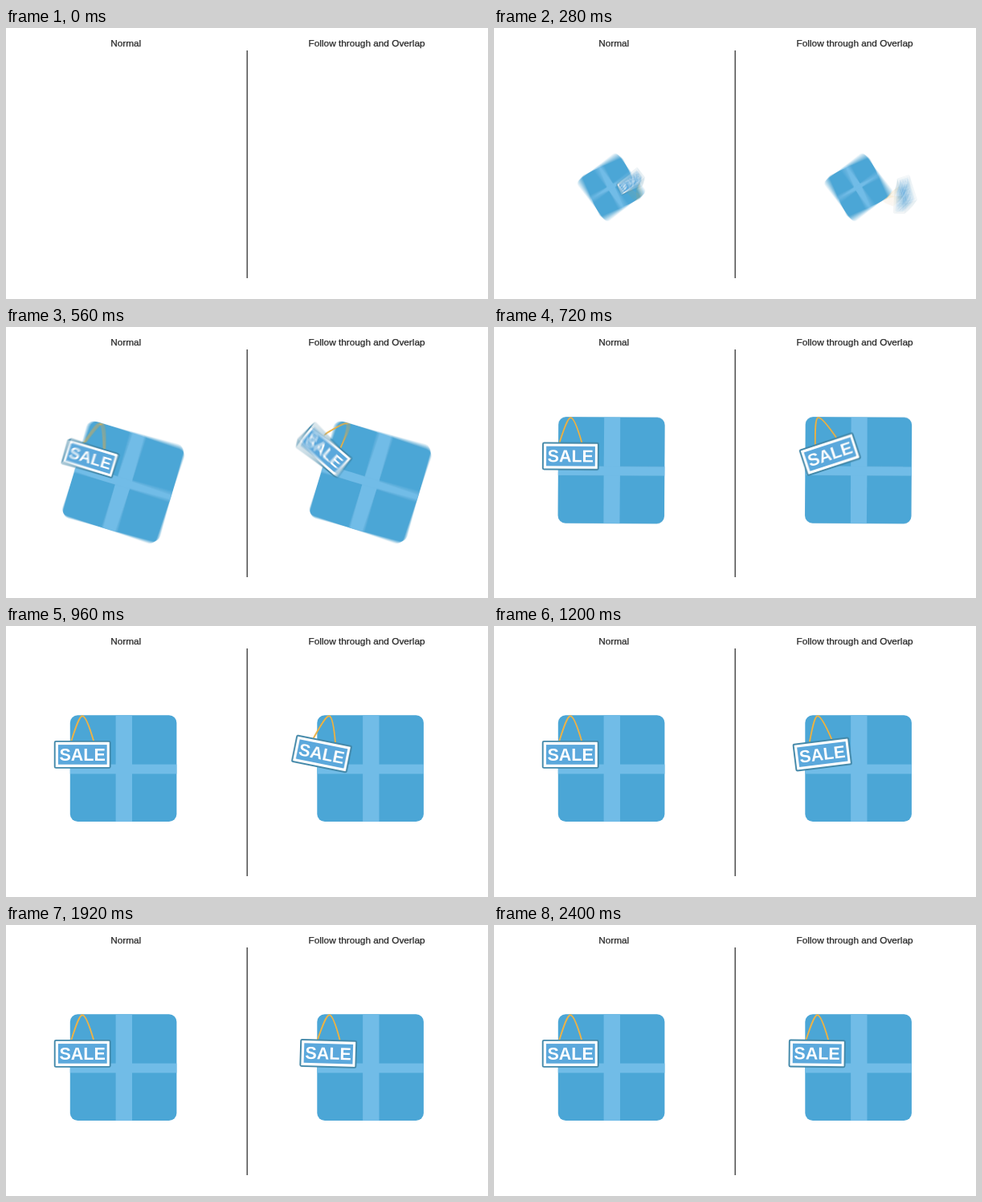
Write an HTML page that moves like this. It is 600 px wide and 338 px high and loops after 2440 ms.

```html
<!DOCTYPE html>
<html lang="en">
<head>
<meta charset="utf-8">
<title>Follow through and overlap</title>
<style>
  html, body { margin: 0; width: 100%; height: 100%; overflow: hidden; background: #fff; }
  svg { display: block; width: 100%; height: 100%; }
  text { font-family: "Liberation Sans", Arial, Helvetica, sans-serif; }
  .label { font-size: 11.8px; fill: #262626; stroke: #262626; stroke-width: .25px; }
  .sale { font-size: 21.5px; font-weight: 700; fill: #fff; text-anchor: middle; }
</style>
</head>
<body>
<svg viewBox="0 0 600 338">
  <defs>
    <g id="box">
      <rect x="-66.3" y="-66.3" width="132.6" height="132.8" rx="9.5" fill="#4ba6d6"/>
      <rect x="-9.5" y="-66.3" width="20.4" height="132.8" fill="#71bce7"/>
      <rect x="-66.3" y="-5" width="132.6" height="11.8" fill="#71bce7"/>
    </g>
    <!-- The origin is the point the tag hangs from. -->
    <g id="tag">
      <path d="M-13.8 32C-9 17 -4 1 0 1S9 15 14 32" fill="none" stroke="#edb246" stroke-width="1.9"/>
      <rect x="-34.4" y="32.6" width="69" height="33" rx="1.5" fill="#fff" stroke="#4389aa" stroke-width="1.9"/>
      <rect x="-30.2" y="36.8" width="60.8" height="24.6" fill="#5ba8dc"/>
      <text class="sale" x="0" y="56.3">SALE</text>
    </g>
  </defs>
  <g id="blur"></g>
  <path d="M300.2 28V312" stroke="#333" stroke-width="1.3"/>
  <text class="label" x="130.2" y="23">Normal</text>
  <text class="label" x="376.6" y="23">Follow through and Overlap</text>
</svg>
<script>
  const LOOP = 2440, STEP = 40, SHUTTER = 20, SAMPLES = 14;
  const SPIN = { start: 150, time: 610, power: 2.48, turn: 270 };
  const LIFT = { start: 460, time: 300, height: 21 };
  const SWING = { rest: 635, speed: 0.32, period: 480, decay: 0.002 };
  const HOOK = [-51, -66.3], CENTERS = [146.1, 453.6], FLOOR = 177.6;

  const progress = (t, m) => Math.min(1, Math.max(0, (t - m.start) / m.time));
  const smooth = u => u * u * (3 - 2 * u);

  // Tag angle relative to its box: steady unwinding, then a damped swing.
  function swing(t) {
    const d = t - SWING.rest, w = 2 * Math.PI / SWING.period;
    if (d < 0) return -d * SWING.speed;
    return -SWING.speed / w * Math.sin(w * d) * Math.exp(-SWING.decay * d);
  }

  function scene(t) {
    const left = Math.pow(1 - progress(t, SPIN), SPIN.power);
    const y = FLOOR + LIFT.height * (1 - smooth(progress(t, LIFT)));
    return CENTERS.map((x, i) => `
      <g transform="translate(${x} ${y}) rotate(${SPIN.turn * left}) scale(${1 - left})">
        <use href="#box"/>
        <use href="#tag" transform="translate(${HOOK}) rotate(${i ? swing(t) : 0})"/>
      </g>`).join("");
  }

  // Opaque layers with opacity 1, 1/2, 1/3 ... add up to their mean.
  function render(t) {
    let out = "";
    for (let k = 0; k < SAMPLES; k++) {
      const at = t + SHUTTER * ((k + 0.5) / SAMPLES - 0.5);
      out += `<g opacity="${1 / (k + 1)}"><rect width="600" height="338" fill="#fff"/>${scene(at)}</g>`;
    }
    blur.innerHTML = out;
  }

  const blur = document.getElementById("blur");
  const begin = performance.now();
  let shown = -1;

  function tick() {
    const t = Math.floor((performance.now() - begin) % LOOP / STEP) * STEP;
    if (t !== shown) render(shown = t);
    requestAnimationFrame(tick);
  }
  tick();
</script>
</body>
</html>
```
